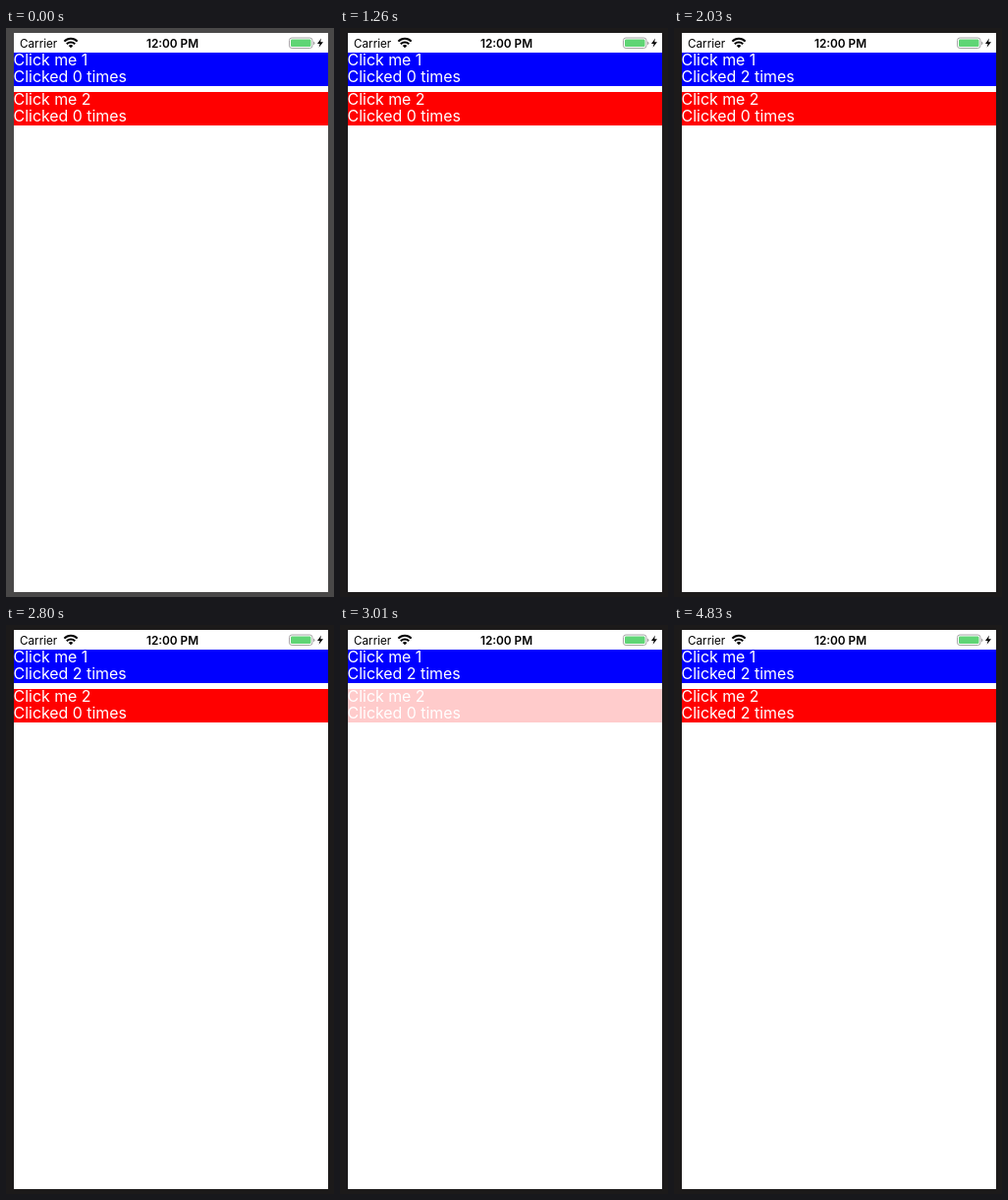
These frames come from a looping animation (334 px wide and 578 px high, 4900 ms). An HTML page:

```html
<!DOCTYPE html>
<html lang="en">
<head>
<meta charset="utf-8">
<title>Tap counters</title>
<style>
  html, body { margin: 0; width: 100%; height: 100%; overflow: hidden; background: #fff; }
  svg { display: block; width: 334px; height: 578px; }
  text { font-family: Inter, Roboto, sans-serif; }
  .row text { font-size: 15.9px; fill: #fff; }
  .bar text { font-size: 11.7px; fill: #000; }
  .bar .clock { font-size: 11.8px; font-weight: 600; }
</style>
</head>
<body>
<svg viewBox="0 0 334 578">
  <rect id="bezel" width="334" height="578" fill="#494848"/>
  <rect x="8" y="5" width="320" height="568" fill="#fff"/>

  <g class="bar">
    <text x="14" y="19.5">Carrier</text>
    <g fill="none" stroke="#000" stroke-width="2.1">
      <path d="M59.4 13.6 A9 9 0 0 1 72.6 13.6"/>
      <path d="M61.8 16.2 A6 6 0 0 1 70.2 16.2"/>
    </g>
    <path d="M66 20.3 L63.7 18 A3.3 3.3 0 0 1 68.3 18 Z"/>
    <text class="clock" x="169.5" y="19.5" text-anchor="middle">12:00 PM</text>
    <rect x="288.5" y="10" width="23.5" height="10.5" rx="2.6" fill="#fff" stroke="#a5a5a5"/>
    <rect x="290" y="11.5" width="20.5" height="7.5" rx="1.3" fill="#5fd575"/>
    <path d="M313 13.4 a2 2 0 0 1 0 3.8 Z" fill="#a5a5a5"/>
    <path d="M321 10.6 L317 16 H319.6 L318.6 19.8 L323 14.2 H320.2 Z"/>
  </g>

  <g class="row">
    <rect x="8" y="25" width="320" height="34" fill="#00f"/>
    <text x="7.6" y="37.5">Click me 1</text>
    <text x="7.6" y="54.5" id="blueCount"></text>
  </g>
  <g class="row" id="redRow">
    <rect x="8" y="65" width="320" height="34" fill="#f00"/>
    <text x="7.6" y="77.5">Click me 2</text>
    <text x="7.6" y="94.5" id="redCount"></text>
  </g>
</svg>

<script>
const LOOP = 4900;
const FOCUS = 1050;
const BLUE_CLICKS = [1330, 2030];
const RED_CLICKS = [3060, 3830];

// [time, opacity] while the red row is pressed and released
const RED_FADE = [
  [2939, 1], [2940, 0.46], [3000, 0.2], [3040, 0.2], [3290, 1],
  [3740, 1], [3780, 0.2], [3810, 0.2], [3990, 1]
];

const $ = id => document.getElementById(id);
const ease = p => p < 0.5 ? 2 * p * p : 1 - 2 * (1 - p) * (1 - p);
const label = (clicks, t) => `Clicked ${clicks.filter(c => t >= c).length} times`;

function valueAt(steps, t) {
  const i = steps.findIndex(s => s[0] > t);
  if (i < 1) return 1;
  const [t0, a] = steps[i - 1];
  const [t1, b] = steps[i];
  return a + (b - a) * ease((t - t0) / (t1 - t0));
}

function setText(id, value) {
  const node = $(id);
  if (node.textContent !== value) node.textContent = value;
}

function draw(now) {
  const t = Math.floor((now % LOOP) / 70) * 70;
  $("bezel").setAttribute("fill", t < FOCUS ? "#494848" : "#1c1a1a");
  $("redRow").setAttribute("opacity", valueAt(RED_FADE, t));
  setText("blueCount", label(BLUE_CLICKS, t));
  setText("redCount", label(RED_CLICKS, t));
}

const start = performance.now();
function tick() {
  draw(performance.now() - start);
  requestAnimationFrame(tick);
}
tick();
</script>
</body>
</html>
```
